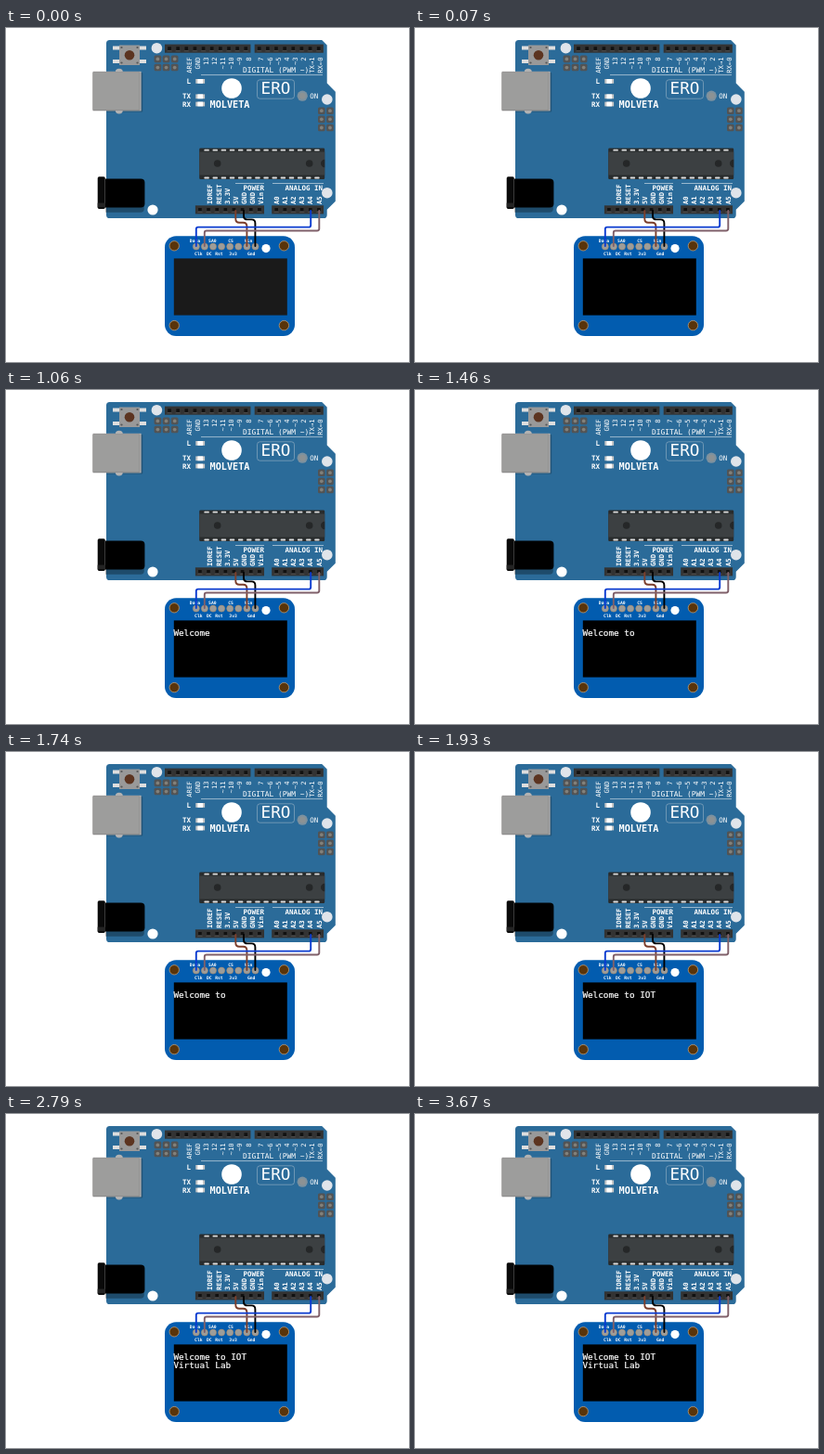
Animation, 434 px wide and 360 px high, one loop 4250 ms. Source, as an HTML page:

```html
<!DOCTYPE html>
<html lang="en">
<head>
<meta charset="utf-8">
<title>Board with display</title>
<style>
html, body { margin: 0; width: 100%; height: 100%; overflow: hidden; background: #fff; }
svg { display: block; width: 100%; height: 100%; }
text { font-family: "DejaVu Sans Mono", monospace; fill: #fff; white-space: pre; }
.silk { font-size: 7.5px; font-weight: bold; }
.pin { font-size: 7.2px; font-weight: bold; }
.thin { font-weight: normal; }
.tiny { font-size: 4.7px; font-weight: bold; }
.oled { font-size: 9.34px; stroke: #fff; stroke-width: 0.2; }
.wire { fill: none; stroke-width: 1.9; stroke-linejoin: round; stroke-linecap: round; }
</style>
</head>
<body>
<svg id="stage" viewBox="0 0 434 360" xmlns="http://www.w3.org/2000/svg"></svg>
<script>
const NS = "http://www.w3.org/2000/svg";
const stage = document.getElementById("stage");
const PITCH = 9.14;

function add(tag, attrs) {
  const el = document.createElementNS(NS, tag);
  for (const key in attrs) el.setAttribute(key, attrs[key]);
  return stage.appendChild(el);
}
const rect = (x, y, width, height, fill, more) => add("rect", { x, y, width, height, fill, ...more });
const circle = (cx, cy, r, fill, more) => add("circle", { cx, cy, r, fill, ...more });
const path = (d, fill, more) => add("path", { d, fill, ...more });
function label(x, y, words, cls, more) {
  const el = add("text", { x, y, class: cls, ...more });
  el.textContent = words;
  return el;
}
function pinLabels(x, y, names, anchor, cls) {
  names.split(" ").forEach((name, i) => {
    const px = x + i * PITCH;
    label(px, y, name, cls, { "text-anchor": anchor, transform: `rotate(-90 ${px} ${y})` });
  });
}
function header(x, y, count) {
  rect(x, y, count * PITCH + 1, 9.1, "#333");
  for (let i = 0; i < count; i++) {
    const px = x + i * PITCH + 3.2;
    rect(px, y + 2.7, 3.6, 3.6, "#111");
    path(`M${px} ${y + 6.3}h3.6l1.4 1.4h-6.4z`, "#4b4b4b");
  }
}
function maleHeader(x, y, cols, rows) {
  for (let c = 0; c < cols; c++) for (let r = 0; r < rows; r++) {
    const px = x + c * PITCH, py = y + r * PITCH;
    rect(px - 3.8, py - 3.8, 7.6, 7.6, "#525354", { rx: 1.6 });
    circle(px, py, 1.9, "#82807a");
  }
}
const wire = (d, stroke) => path(d, "none", { class: "wire", stroke });

function drawBoard() {
  path("M111.6 13H340.2L345.7 18.5V59.6L354.8 68.8V186.7L345.7 195.8V201.4Q345.7 205 342 205H111.6Q108 205 108 201.4V16.6Q108 13 111.6 13Z", "#2b6b99");
  [[162.4, 21.7], [345.8, 77], [345.8, 177.7]].forEach(([x, y]) => circle(x, y, 5.8, "#e0e4ea"));
  circle(158, 196, 5.6, "#fff");

  // reset button
  for (const y of [19.5, 34]) {
    rect(115, y, 8, 4, "#dedede");
    rect(143, y, 8, 4, "#dedede");
  }
  rect(122, 18.5, 22, 21.5, "#999");
  for (const x of [124.5, 141.5]) for (const y of [21, 37.5]) circle(x, y, 1.1, "#555");
  circle(133, 29.2, 5.3, "#5c3420");

  // USB socket
  rect(108, 48, 39.2, 42.5, "#000", { opacity: 0.22, rx: 1 });
  add("ellipse", { cx: 121.8, cy: 47.4, rx: 4, ry: 3.6, fill: "#b3b2b2" });
  add("ellipse", { cx: 121.8, cy: 88.8, rx: 4, ry: 3.6, fill: "#b3b2b2" });
  rect(93.6, 46.8, 52, 42.6, "#b3b2b2");
  rect(93.6, 47.6, 50.6, 41, "#706f6f");
  rect(93.6, 48, 50.2, 40.2, "#9d9d9c");

  // power jack and its shadow
  path("M107 164H145Q148.8 164 148.8 167.6V195Q148.8 198.7 145 198.7H107Z", "#000", { opacity: 0.3 });
  path("M107 162.4H145Q149.4 162.4 149.4 166.6V189.4Q149.4 193.4 145 193.4H107Z", "#000");
  rect(98.7, 160.3, 8.1, 34.6, "#0a0a0a", { rx: 1.6 });
  rect(98.7, 188.6, 8.1, 4.6, "#242424");

  header(171, 17.6, 10);
  header(267.7, 17.6, 8);
  header(203.9, 191.3, 8);
  header(286.2, 191.3, 6);
  maleHeader(163.4, 33.4, 3, 2);
  maleHeader(339.8, 89.2, 2, 3);

  // microcontroller
  rect(208.2, 129.4, 135, 33.6, "#292c2d", { rx: 1.3 });
  rect(208.2, 133.5, 135, 25, "#3c4042");
  for (let i = 0; i < 14; i++) {
    const x = 213.4 + i * PITCH;
    rect(x, 130.7, 5.4, 1.8, "#ddd", { rx: 0.6 });
    rect(x, 160.6, 5.4, 1.8, "#ddd", { rx: 0.6 });
  }
  circle(227.7, 146, 3.8, "#252728");
  circle(326.7, 146, 3.8, "#252728");
  path("M343.2 141.8a4.2 4.2 0 0 0 0 8.4z", "#252728");

  // indicator lights
  for (const y of [57.4, 73.8, 82]) {
    rect(204.3, y - 2.4, 9.8, 4.8, "#c6c6c6");
    rect(206.4, y - 2.4, 5.6, 4.8, "#fff");
  }
  circle(319.2, 73.2, 5.6, "#7c919f");
  circle(319.2, 73.2, 3.4, "#8c9294");
}

function drawSilk() {
  pinLabels(199.6, 31.4, "AREF GND 13 12 ~11 ~10 ~9 8", "end", "pin thin");
  pinLabels(277.5, 31.4, "7 ~6 ~5 4 ~3 2 TX→1 RX←0", "end", "pin thin");
  pinLabels(222.4, 190, "IOREF RESET 3.3V 5V GND GND Vin", "start", "pin");
  pinLabels(293.8, 190, "A0 A1 A2 A3 A4 A5", "start", "pin");
  label(255, 47.6, "DIGITAL (PWM ~)", "silk thin", { style: "font-size:7.9px" });
  label(255.5, 175.4, "POWER", "silk");
  label(300.5, 175.4, "ANALOG IN", "silk");
  path("M210 50.6H341M247 167.5H278M287 167.5H342", "none", { stroke: "#fff", "stroke-width": 0.7, opacity: 0.75 });
  label(194.6, 60.2, "L", "silk");
  label(190, 76.4, "TX", "silk");
  label(190, 84.8, "RX", "silk");
  label(327.3, 76, "ON", "silk thin");

  circle(243, 65, 10.8, "#fff");
  label(219.5, 86.4, "MOLVETA", "", { style: "font-size:10.2px;font-weight:bold" });
  rect(270.5, 55.8, 40, 20.4, "none", { rx: 3, stroke: "#8aa9c1", "stroke-width": 0.7 });
  label(274.6, 71.3, "ERO", "", { style: "font-size:17.6px" });
}

function drawDisplay() {
  rect(171, 224.2, 140, 107.8, "#025caf", { rx: 12.2 });
  for (const x of [181.2, 299.4]) for (const y of [234.8, 320.6])
    circle(x, y, 5.2, "#59340a", { stroke: "#be9b72", "stroke-width": 0.8 });
  for (let i = 0; i < 8; i++)
    circle(204.8 + i * 9.1, 235.6, 3.5, "#9d9d9a", { stroke: "#b08d6a", "stroke-width": 0.6 });
  const top = [[203.5, "Data"], [222.3, "SA0"], [242, "CS"], [261, "Vin"]];
  const low = [[207.3, "Clk"], [218.8, "DC"], [229.4, "Rst"], [244.6, "3v3"], [264.2, "Gnd"]];
  top.forEach(([x, s]) => label(x, 231.4, s, "tiny", { "text-anchor": "middle" }));
  low.forEach(([x, s]) => label(x, 245.4, s, "tiny", { "text-anchor": "middle" }));
  circle(280, 237.6, 4.6, "#fff");
}

function drawWires() {
  wire("M247.3 197V205.8Q247.3 209.8 251.3 209.8H255.4Q259.4 209.8 259.4 213.8V235", "#7c3f2c");
  wire("M256 197V202.4Q256 206.4 260 206.4H264.4Q268.4 206.4 268.4 210.4V235", "#000");
  wire("M337.3 197V216.3Q337.3 218.5 335 218.5H216Q213.8 218.5 213.8 220.8V235", "#80606a");
  wire("M328.2 197V212.4Q328.2 214.6 326 214.6H207Q204.8 214.6 204.8 216.8V235", "#0a3bd0");
}

drawBoard();
drawSilk();
drawDisplay();
drawWires();
const screen = rect(180.8, 248.4, 122, 61.2, "#1a1a1a");
const lines = [label(180.4, 265, "", "oled"), label(180.4, 274.3, "", "oled")];

const LOOP = 4250;
const POWER_ON = 70;
const words = [
  [1060, 0, "Welcome"], [1460, 0, " to"], [1930, 0, " IOT"],
  [2390, 1, "Virtual"], [2790, 1, " Lab"]
];

function render(t) {
  screen.setAttribute("fill", t < POWER_ON ? "#1a1a1a" : "#000");
  lines.forEach((line, row) => {
    line.textContent = words.filter(w => w[1] === row && t >= w[0]).map(w => w[2]).join("");
  });
}

const start = performance.now();
function tick() {
  render((performance.now() - start) % LOOP);
  requestAnimationFrame(tick);
}
render(0);
requestAnimationFrame(tick);
</script>
</body>
</html>
```
